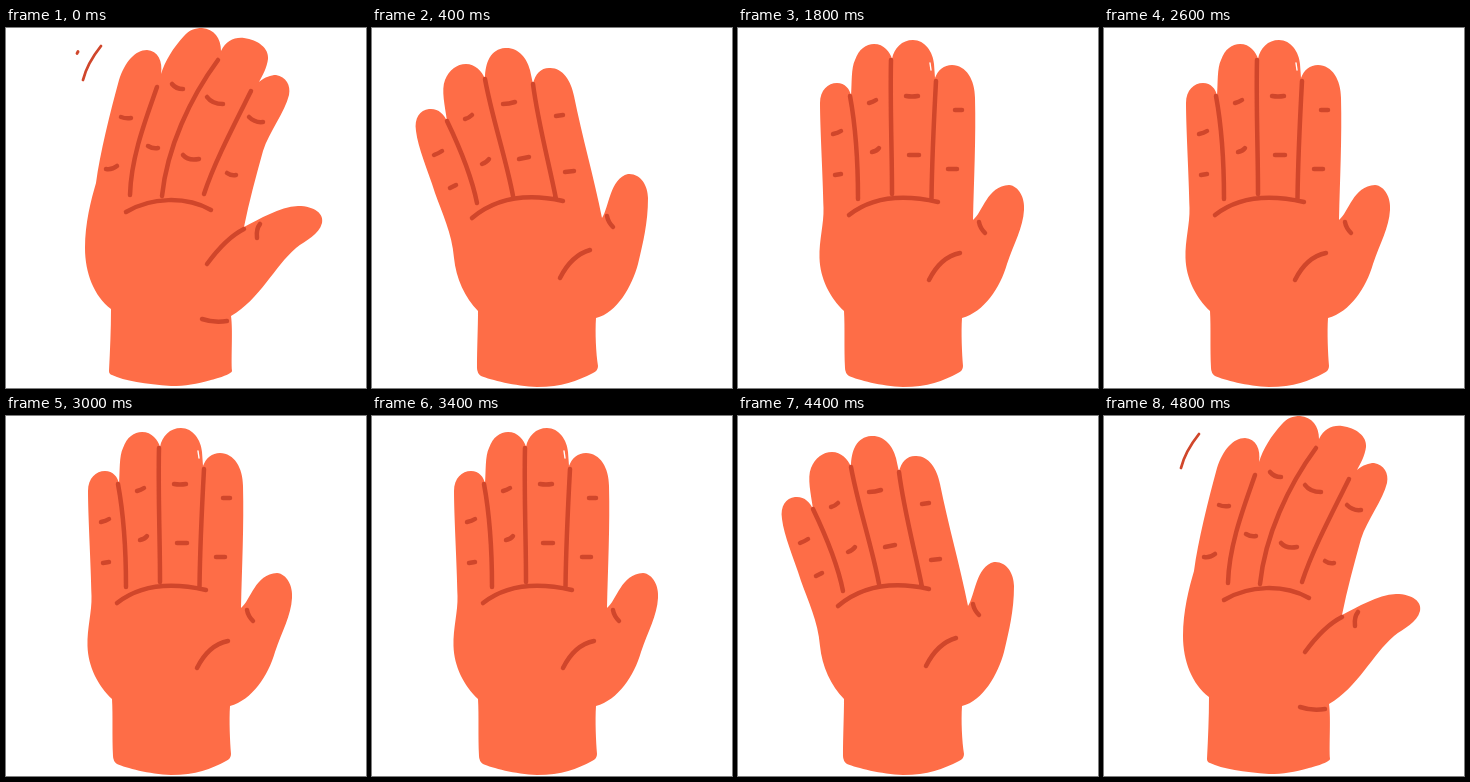
An HTML page for the animation above (5000 ms loop, 360 by 360 pixels).

```html
<!DOCTYPE html>
<html lang="en">
<head>
<meta charset="utf-8">
<title>Waving hand</title>
<style>
html, body { margin: 0; height: 100%; overflow: hidden; background: #fff; }
svg { display: block; width: 100vw; height: 100vh; }
.skin { fill: #fe6d47; }
.line { fill: none; stroke: #d0462b; stroke-width: 4.5; stroke-linecap: round; stroke-linejoin: round; }
.thin { stroke-width: 2.8; }
.gap { fill: none; stroke: #fff; stroke-width: 1.4; stroke-linecap: round; }
</style>
</head>
<body>
<svg viewBox="0 0 360 360">
  <g id="right">
    <path class="skin" d="M103 343C104 322 105 302 105 281C88 268 79 245 79 220C79 195 85 172 90 155C94 125 104 85 113 52
      C119 34 129 22 141 22C152 23 157 33 155 46C159 33 167 20 178 8C183 2 189 0 196 0C208 1 215 10 215 23
      C220 13 228 9 238 10C252 12 263 20 262 31C261 39 257 47 253 54C259 49 265 47 270 47C280 49 285 57 283 67
      C279 84 263 104 257 123C250 148 243 174 238 199C254 191 273 179 292 178C309 178 318 186 316 195
      C313 207 300 212 290 220C268 239 254 271 225 288C227 302 225 330 226 343C226 346 210 351 205 352
      C190 356 180 358 165 358C140 356 118 353 106 347Q103 346 103 343Z"/>
    <path class="line" d="M151 59C141 88 125 128 124 167M212 32C184 70 161 120 156 168M245 63C228 97 208 135 198 166
      M120 184C145 169 180 168 205 182M201 236C212 221 224 208 238 201M254 196Q250 201 251 210M196 291Q208 295 221 293
      M115 89q5 2 10 1M166 56q4 5 11 5M201 69q5 7 16 7M243 89q6 6 14 5M142 118q5 3 10 2M177 127q5 6 16 4M221 145q4 3 9 2M100 141q6 1 11 -3"/>
    <path class="line thin" d="M95 18C87 28 80 40 77 52"/>
    <path id="speck" class="line thin" d="M72 23.500L71 25.500"/>
  </g>
  <g id="middle">
    <path class="skin" d="M107 340C106 320 107 300 106 283C92 270 82 250 81.500 230C81 212 86 196 85.500 180C85 150 82 100 82 75
      C82 62 90 55 99 55C107 55 112 61 113 68C114 55 113 40 117 32C121 21 128 16 136 16C146 16 152 24 154 31
      C156 20 164 12 175 12C187 12 195 24 196 36L197 50C200 42 206 37 214 37C228 37 237 52 237 70
      C238 110 236 150 235 192C245 184 249 158 271 157C281 158 287 170 286 182C285 200 276 215 269 236
      C262 260 246 284 224 290C223 305 224 325 225 338Q225 343 220 345C205 353 190 359 165 359C143 358 120 352 111 348Q107 345 107 340Z"/>
    <path class="line" d="M112 68C117 95 120 130 120 171M153 32C152 80 154 120 154 166M198 53C196 90 194 130 193.500 171
      M111 187C135 168 165 166 200 174M191 252C197 240 207 228 222 225M241 194Q242 200 247 205
      M131 75q4 -1 7 -3M168 68q6 1 12 0M217 82h7M95 106q5 -1 8 -3M134 124q5 -1 7 -4M171 127h10M210 141h9M97 147l6 -1"/>
    <path class="gap" d="M192 35L193 42"/>
  </g>
  <g id="left">
    <path class="skin" d="M105 340C105 320 106 300 106 283C93 270 84 250 82 230C80 205 70 185 63 165C55 140 46 120 44 103
      C42 90 48 82 57 81C66 80 72 86 75 93C73 78 69 62 73 52C77 42 85 36 94 36C103 36 110 43 113 51
      C113 34 119 21 133 20C146 19 155 30 158 42L161 56C163 46 169 40 177 40C190 39 199 52 202 68
      C210 108 222 150 230 190C237 180 238 150 256 146C268 145 276 157 276 170C276 195 271 215 266 236
      C260 258 245 285 224 290C223 305 224 325 226 338Q226 343 221 345C205 353 190 359 165 359C143 358 119 352 109 348Q105 345 105 340Z"/>
    <path class="line" d="M75 93C87 118 99 145 105 175M113 51C120 90 134 130 141 168M161 56C166 95 177 135 184 171
      M100 190C125 169 155 165 191 173M188 250C194 238 204 226 218 222M235 188Q236 194 241 199
      M93 91q4 -1 7 -4M131 76q6 0 12 -2M184 88l7 -1M62 127q5 -2 8 -4M110 136q5 -2 7 -5M147 131l10 -2M193 144l9 -1M78 160l6 -3"/>
  </g>
</svg>
<script>
const STEP = 200, LOOP = 5000;
const cycle = ["right", "middle", "left", "middle"];
const show = (id, on) => document.getElementById(id).style.display = on ? "" : "none";

function draw(now) {
  const step = Math.floor((now % LOOP) / STEP);
  const pose = cycle[step % cycle.length];
  for (const id of ["right", "middle", "left"]) show(id, id === pose);
  show("speck", step === 0);
}

const start = performance.now();
function tick() {
  draw(performance.now() - start);
  requestAnimationFrame(tick);
}
tick();
</script>
</body>
</html>
```
